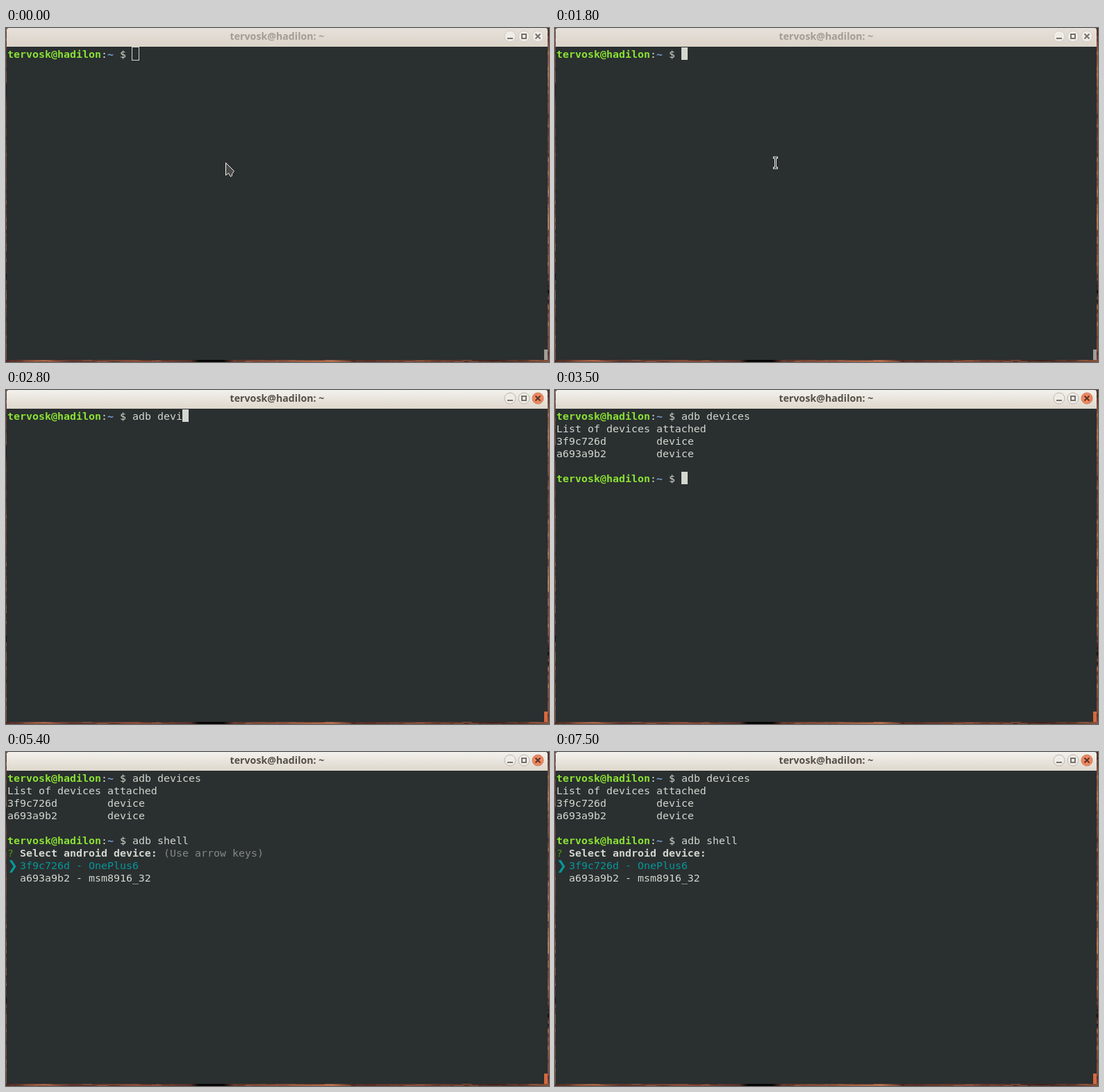
Recreate the animation shown at these times as an HTML page. Size 782 by 482 pixels, loop 8000 ms.

```html
<!DOCTYPE html>
<html lang="en">
<head>
<meta charset="utf-8">
<title>Terminal</title>
<style>
  html, body { margin: 0; width: 100%; height: 100%; overflow: hidden; background: #2a2f30; }
  svg { display: block; width: 782px; height: 482px; }
  .term { font: 14.95px "DejaVu Sans Mono", monospace; fill: #d3d7cf; }
  .bold { font-weight: bold; }
  .user { font-weight: bold; fill: #8ae234; }
  .path { font-weight: bold; fill: #729fcf; }
  .mark { fill: #4e9a06; }
  .hint { fill: #858885; }
  .pick { fill: #06989a; }
  .arrow { font: bold 18px "DejaVu Sans", sans-serif; fill: #06989a; transform: translateY(1px); }
  #title { font: bold 14.2px "Noto Sans", "Open Sans", sans-serif; text-anchor: middle; }
</style>
</head>
<body>
<svg viewBox="0 0 782 482">
  <defs>
    <linearGradient id="barIdle" x2="0" y2="1">
      <stop stop-color="#e5e0da"/><stop offset="1" stop-color="#dcd4c9"/>
    </linearGradient>
    <linearGradient id="barActive" x2="0" y2="1">
      <stop stop-color="#f3f1ed"/><stop offset="1" stop-color="#ded7cc"/>
    </linearGradient>
    <linearGradient id="leftWall" x2="0" y2="1">
      <stop stop-color="#5a3128"/><stop offset=".15" stop-color="#7b4a38"/>
      <stop offset=".18" stop-color="#120c0b"/><stop offset=".22" stop-color="#63372c"/>
      <stop offset=".6" stop-color="#7a4335"/><stop offset=".72" stop-color="#54302a"/>
      <stop offset=".74" stop-color="#0c0808"/><stop offset=".77" stop-color="#5f382d"/>
      <stop offset="1" stop-color="#8a523a"/>
    </linearGradient>
    <linearGradient id="rightWall" x2="0" y2="1">
      <stop stop-color="#6b3d30"/><stop offset=".15" stop-color="#a8674a"/>
      <stop offset=".3" stop-color="#5f372c"/><stop offset=".58" stop-color="#b57250"/>
      <stop offset=".76" stop-color="#6b3d30"/><stop offset=".78" stop-color="#0c0808"/>
      <stop offset=".81" stop-color="#0c0808"/><stop offset=".84" stop-color="#8a523a"/>
      <stop offset="1" stop-color="#7b4535"/>
    </linearGradient>
    <linearGradient id="floorWall">
      <stop stop-color="#4a2822"/><stop offset=".07" stop-color="#b0694a"/>
      <stop offset=".12" stop-color="#54302a"/><stop offset=".24" stop-color="#8a4d39"/>
      <stop offset=".34" stop-color="#54302a"/><stop offset=".355" stop-color="#060404"/>
      <stop offset=".4" stop-color="#060404"/><stop offset=".42" stop-color="#6b3b2e"/>
      <stop offset=".6" stop-color="#b56e4c"/><stop offset=".64" stop-color="#4a2822"/>
      <stop offset=".78" stop-color="#7b4535"/><stop offset=".9" stop-color="#3a211d"/>
      <stop offset="1" stop-color="#8a523a"/>
    </linearGradient>
  </defs>

  <rect width="1" height="482" fill="url(#leftWall)"/>
  <rect x="780" width="2" height="482" fill="url(#rightWall)"/>
  <rect y="479" width="782" height="3" fill="url(#floorWall)"/>
  <g id="grain" opacity=".45"></g>
  <rect x="1" y="26" width="779" height="453" fill="#2a2f30"/>
  <path id="bar" d="M1 27V3Q1 0 4 0H777Q780 0 780 3V27Z"/>
  <text id="title" x="390.5" y="17">tervosk@hadilon: ~</text>

  <g id="buttons" fill="#efece8">
    <circle cx="726" cy="12" r="8"/>
    <circle cx="746" cy="12" r="8"/>
    <circle id="close" cx="766" cy="12" r="8"/>
  </g>
  <g fill="none" stroke="#77726a" stroke-width="2">
    <path d="M722 15H730M743 9H749V15H743Z"/>
    <path id="cross" d="M762.5 8.5L769.5 15.5M769.5 8.5L762.5 15.5"/>
  </g>
  <rect id="thumb" x="775" y="464" width="5" height="15"/>

  <g id="screen" class="term"></g>
  <rect id="caret"/>

  <path id="pointer" d="M316.5 194.5V212.5L320.5 209.5L323.5 214.5L325.5 213V210.5L328.5 206.5Z"
        fill="#4b4b49" stroke="#f4f4f2"/>
  <g id="beam" fill="none">
    <path d="M314 187H321M317.5 187V202M314 202H321" stroke="#f4f4f2" stroke-width="3"/>
    <path d="M315 187H320M317.5 187V202M315 202H320" stroke="#1d2122"/>
  </g>
</svg>

<script>
const LOOP = 8000, COL = 9, ROW = 18, LEFT = 2, TOP = 28, BASELINE = 15;
const $ = id => document.getElementById(id);

// [start ms, characters typed]
const FIRST = { text: 'adb devices', keys: [[2000, 1], [2300, 3], [2500, 5], [2700, 7], [2800, 8], [2900, 9], [3000, 10], [3400, 11]] };
const SECOND = { text: 'adb shell', keys: [[4000, 1], [4300, 2], [4400, 4], [4600, 5], [4800, 7], [5100, 8], [5300, 9]] };
const DEVICES = ['3f9c726d - OnePlus6', 'a693a9b2 - msm8916_32'];

const typed = ({ text, keys }, t) =>
  text.slice(0, keys.reduce((n, [at, count]) => t >= at ? count : n, 0));

const run = (row, col, text, style = '') =>
  `<text x="${LEFT + col * COL}" y="${TOP + BASELINE + row * ROW}" class="${style}">${text}</text>`;

const prompt = (row, command) =>
  run(row, 0, 'tervosk@hadilon', 'user') + run(row, 15, ':') +
  run(row, 16, '~', 'path') + run(row, 18, '$') + run(row, 20, command);

function menu(t) {
  const chosen = t >= 7000 && t < 7500 ? 1 : 0;
  return run(6, 0, '?', 'mark') + run(6, 2, 'Select android device:', 'bold') +
    (t < 7000 ? run(6, 25, '(Use arrow keys)', 'hint') : '') +
    run(7 + chosen, 0, '❯', 'arrow') +
    DEVICES.map((name, i) => run(7 + i, 2, name, i === chosen ? 'pick' : '')).join('');
}

function screen(t) {
  let out = prompt(0, typed(FIRST, t));
  if (t >= 3500) {
    out += run(1, 0, 'List of devices attached');
    DEVICES.forEach((name, i) => {
      out += run(2 + i, 0, name.slice(0, 8)) + run(2 + i, 16, 'device');
    });
    out += prompt(5, typed(SECOND, t));
  }
  return t >= 5400 ? out + menu(t) : out;
}

function caretCell(t) {
  if (t < 3500) return [0, 20 + typed(FIRST, t).length];
  if (t < 5300) return [5, 20 + typed(SECOND, t).length];
  return [6, 0];
}

const set = (id, attrs) => {
  for (const name in attrs) $(id).setAttribute(name, attrs[name]);
};
const show = (id, visible) => set(id, { visibility: visible ? 'visible' : 'hidden' });

function drawCaret(t) {
  const [row, col] = caretCell(t);
  const hollow = t < 1800, grow = hollow ? 0.5 : 0;
  set('caret', {
    x: LEFT + col * COL - grow, y: TOP + row * ROW - grow,
    width: COL + 2 * grow, height: ROW + 2 * grow,
    fill: hollow ? 'none' : '#d3d7cf', stroke: hollow ? '#d3d7cf' : 'none'
  });
  show('caret', t < 5400 && !(t >= 3900 && t < 4000));
}

function drawWindow(active) {
  set('bar', { fill: `url(#${active ? 'barActive' : 'barIdle'})` });
  set('title', { fill: active ? '#544f47' : '#a29c94' });
  set('buttons', { stroke: active ? '#bdb6ac' : '#d2ccc4' });
  set('close', active ? { fill: '#ee8860', stroke: '#d07a56' } : { fill: '#efece8', stroke: '#d2ccc4' });
  set('cross', { stroke: active ? '#5d3527' : '#77726a' });
  set('thumb', { fill: active ? '#d5693f' : '#a09d98' });
}

// Mottled wallpaper showing around the window
function drawGrain() {
  let seed = 7, out = '';
  const random = () => (seed = seed * 16807 % 2147483647) / 2147483647;
  const shade = () => ['#2c1815', '#5a3128', '#8a4d39', '#c98258'][Math.floor(random() * 4)];
  for (let y = 0; y < 482; y += 4 + random() * 8) {
    out += `<rect x="780" y="${y}" width="2" height="5" fill="${shade()}"/>`;
    out += `<rect y="${y}" width="1" height="5" fill="${shade()}"/>`;
  }
  for (let x = 0; x < 782; x += 8 + random() * 16) {
    if (x > 255 && x < 320) continue;
    out += `<rect x="${x}" y="${479 + Math.floor(random() * 3)}" width="14" height="1" fill="${shade()}"/>`;
  }
  $('grain').innerHTML = out;
}

let shown = '';
function render(t) {
  const next = screen(t);
  if (next !== shown) $('screen').innerHTML = shown = next;
  drawWindow(t >= 1900);
  drawCaret(t);
  show('pointer', t < 200);
  show('beam', t >= 200 && t < 2000);
}

drawGrain();
const start = performance.now();
function tick() {
  render((performance.now() - start) % LOOP);
  requestAnimationFrame(tick);
}
tick();
</script>
</body>
</html>
```
